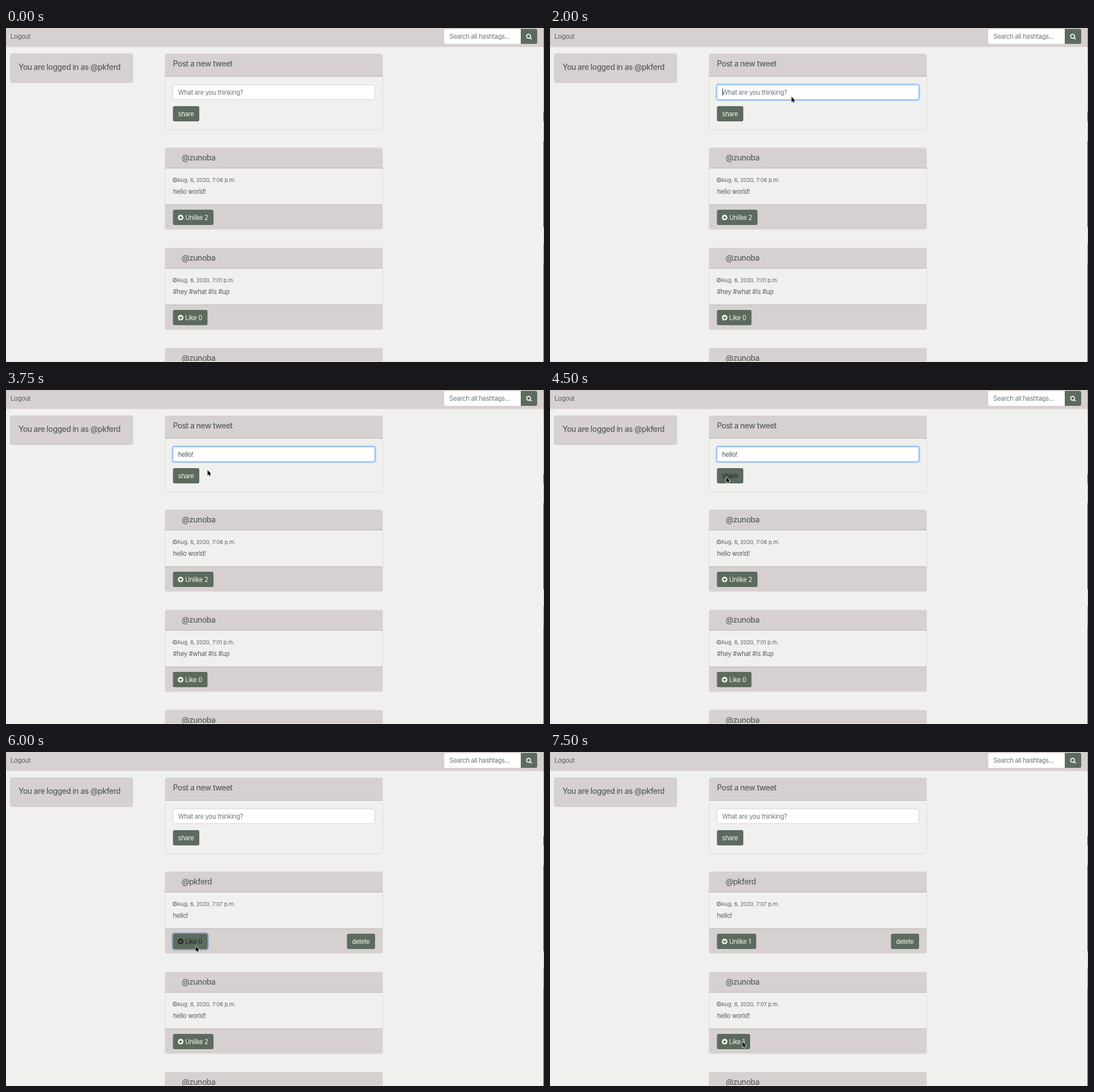
These frames come from a looping animation (949 by 590 pixels, 8000 ms). An HTML page with a canvas:

```html
<!DOCTYPE html>
<html lang="en">
<head>
<meta charset="utf-8">
<title>Post feed</title>
<style>
  html, body { margin: 0; width: 100%; height: 100%; overflow: hidden; background: #f0f0ee; }
  canvas { display: block; }
</style>
</head>
<body>
<canvas id="stage" width="949" height="590"></canvas>
<script>
const ctx = document.getElementById('stage').getContext('2d');
const LOOP = 8000, STEP = 250;
const ME = '@pkferd', FRIEND = '@zunoba';
const C = {
  page: '#f0f0ee', bar: '#d7d0d0', line: '#b9b5b4', edge: '#dddcda',
  green: '#5c6b5e', text: '#586158', body: '#566157', hint: '#6c7479',
  field: '#cfd3d7', focus: '#80b4f5', ink: '#495057', hover: '#202724'
};

// size, weight, tracking in em
const TYPE = {
  base: [11.2, 400, -0.025],
  head: [13.8, 500, -0.035],
  small: [9.3, 400, 0],
  option: [9, 600, 0]
};

function setType(kind) {
  const [size, weight, track] = TYPE[kind];
  ctx.font = `${weight} ${size}px Inter, "Liberation Sans", sans-serif`;
  ctx.letterSpacing = `${track * size}px`;
}

function text(str, x, y, color, kind = 'base') {
  setType(kind);
  ctx.fillStyle = color;
  ctx.fillText(str, x, y);
}

function widthOf(str, kind = 'base') {
  setType(kind);
  return ctx.measureText(str).width;
}

function box(x, y, w, h, r, fill, stroke, lineWidth = 1) {
  ctx.beginPath();
  ctx.roundRect(x, y, w, h, r);
  if (fill) { ctx.fillStyle = fill; ctx.fill(); }
  if (stroke) { ctx.strokeStyle = stroke; ctx.lineWidth = lineWidth; ctx.stroke(); }
}

function rect(x, y, w, h, fill) {
  ctx.fillStyle = fill;
  ctx.fillRect(x, y, w, h);
}

function heartIcon(x, y, color) {
  ctx.beginPath();
  ctx.arc(x, y, 4.9, 0, Math.PI * 2);
  ctx.fillStyle = color;
  ctx.fill();
  ctx.beginPath();
  ctx.moveTo(x, y + 3);
  ctx.lineTo(x - 2.8, y - 0.2);
  ctx.quadraticCurveTo(x - 2.4, y - 2.6, x, y - 1.2);
  ctx.quadraticCurveTo(x + 2.4, y - 2.6, x + 2.8, y - 0.2);
  ctx.fillStyle = C.green;
  ctx.fill();
}

function clockIcon(x, y) {
  ctx.strokeStyle = C.body;
  ctx.lineWidth = 1.1;
  ctx.beginPath();
  ctx.arc(x, y, 3.3, 0, Math.PI * 2);
  ctx.moveTo(x + 0.2, y - 2);
  ctx.lineTo(x + 0.2, y + 0.5);
  ctx.lineTo(x - 1.6, y + 0.5);
  ctx.stroke();
}

function button(label, x, y, { icon = false, hover = false, focus = false, right = false } = {}) {
  const lead = icon ? 21.5 : 9;
  const w = lead + widthOf(label) + 9.5;
  if (right) x -= w;
  if (focus) box(x - 1, y - 1, w + 2, 29, 4, null, 'rgba(100,135,205,.65)', 2.4);
  box(x, y, w, 27, 3, C.green);
  const color = hover ? C.hover : '#f4f6f3';
  if (icon) heartIcon(x + 13.5, y + 13.7, color);
  text(label, x + lead, y + 17.7, color);
}

function post(y, p) {
  box(280.5, y + 0.5, 384, 144.5, 3, C.page, C.edge);
  box(281, y + 1, 383, 35.5, [3, 3, 0, 0], C.bar);
  rect(281, y + 36, 383, 1, C.line);
  text(p.user, 310, y + 23, C.text, 'head');
  if (!p.time) return;
  clockIcon(298, y + 57.3);
  text(`Aug. 6, 2020, ${p.time} p.m.`, 302, y + 60.7, C.body, 'small');
  text(p.msg, 294.5, y + 82.3, C.body);
  box(281, y + 101, 383, 43.5, [0, 0, 3, 3], C.bar);
  rect(281, y + 100.5, 383, 1, C.line);
  button(p.like, 294.5, y + 110, { icon: true, hover: p.hover, focus: p.focus });
  if (p.own) button('delete', 651, y + 110, { right: true });
}

function navbar() {
  rect(0, 0, 949, 33.5, C.bar);
  text('Logout', 8, 19, C.text);
  box(773, 2, 136, 26, [3, 0, 0, 3], '#fff');
  text('Search all hashtags...', 782, 19, C.hint);
  box(908, 1.5, 29, 26.5, [0, 3, 3, 0], C.green);
  ctx.strokeStyle = '#fff';
  ctx.lineWidth = 1.7;
  ctx.beginPath();
  ctx.arc(921.8, 14.6, 3.5, 0, Math.PI * 2);
  ctx.moveTo(924.4, 17.2);
  ctx.lineTo(927.2, 20);
  ctx.stroke();
}

function compose(s) {
  box(280.5, 45.5, 384, 134, 3, C.page, C.edge);
  box(281, 46, 383, 40, [3, 3, 0, 0], C.bar);
  rect(281, 85, 383, 1, C.line);
  text('Post a new tweet', 294.5, 67.6, C.text, 'head');

  if (s.focused) box(293.5, 99.2, 358.5, 28.6, 4, null, 'rgba(120,175,255,.5)', 2.6);
  box(294.5, 100.5, 356, 26, 3, '#fff', s.focused ? C.focus : s.clicked ? '#bccfe2' : C.field);
  if (s.typed) text(s.typed, 303.5, 117.7, C.ink);
  else text('What are you thinking?', 303.5, 117.7, C.hint);
  if (s.caret) rect(304 + (s.typed ? widthOf(s.typed) : 0), 107, 1, 13, '#303538');
  button('share', 294.5, 138, { hover: s.shareHover, focus: s.sharePress });
}

function suggestions(list) {
  if (!list.length) return;
  const h = 11.5 + list.length * 25.5;
  ctx.save();
  ctx.shadowColor = 'rgba(0,0,0,.4)';
  ctx.shadowBlur = 3;
  ctx.shadowOffsetY = 1;
  box(294, 127, 135.5, h, [0, 0, 3, 3], '#fff');
  ctx.restore();
  list.forEach((item, i) => text(item, 302.8, 149.3 + i * 25.5, '#1c1c1c', 'option'));
}

// slivers of the desktop at the right rim
const RIM = [[0, '#8d8a8c'], [35, '#b99aa8'], [70, '#8fc0dc'], [148, '#35404c'], [165, '#7fb4cf'],
  [200, '#2c3c55'], [262, '#3a3b42'], [352, '#c9c6c4'], [382, '#8a7b76'], [416, '#54423d']];

function rim() {
  RIM.forEach(([y, color], i) => {
    const end = i + 1 < RIM.length ? RIM[i + 1][0] : 590;
    rect(948, y, 1, end - y, color);
  });
  rect(0, 589, 948, 1, '#e8e8e6');
}

// time, x, y of the pointer tip
const PATH = [
  [750, 760, 420], [1000, 600, 270], [1250, 455, 140], [1500, 426, 121.5], [3250, 426, 121.5],
  [3500, 400, 129], [4000, 311, 154], [5000, 311, 154], [5250, 318, 235], [5500, 332, 338],
  [5750, 334.5, 343], [6250, 334.5, 343], [6500, 394, 410], [6750, 380, 486],
  [7000, 345, 508], [7250, 339.5, 512]
];

function pointer(t) {
  if (t < PATH[0][0]) return;
  let i = PATH.findIndex(k => k[0] > t);
  if (i < 0) i = PATH.length;
  const a = PATH[i - 1], b = PATH[i] || a;
  const f = b === a ? 0 : (t - a[0]) / (b[0] - a[0]);
  ctx.save();
  ctx.translate(a[1] + (b[1] - a[1]) * f, a[2] + (b[2] - a[2]) * f);
  ctx.beginPath();
  [[0, 0], [0, 9.4], [2.2, 7.4], [3.7, 10.8], [5.2, 10.1], [3.8, 6.9], [6.7, 6.7]]
    .forEach(([x, y]) => ctx.lineTo(x, y));
  ctx.closePath();
  ctx.lineJoin = 'round';
  ctx.strokeStyle = '#fff';
  ctx.lineWidth = 1.4;
  ctx.stroke();
  ctx.fillStyle = '#000';
  ctx.fill();
  ctx.restore();
}

const TYPING = [[2250, 'h'], [2500, 'he'], [2750, 'hell'], [3000, 'hello'], [3250, 'hello!'], [5000, '']];
const HISTORY = ['hello world!', 'hello', 'hello there!', 'hi everyone', 'how are you?'];

function stateAt(t) {
  const within = (a, b) => t >= a && t < b;
  const typed = (TYPING.filter(k => k[0] <= t).pop() || [0, ''])[1];
  const hello = { user: FRIEND, time: '7:06', msg: 'hello world!', like: 'Unlike 2' };
  let posts;
  if (t < 5000) {
    posts = [hello, { user: FRIEND, time: '7:01', msg: '#hey #what #is #up', like: 'Like 0' }];
  } else {
    const mine = {
      user: ME, time: '7:07', msg: 'hello!', own: true,
      like: t < 6250 ? 'Like 0' : 'Unlike 1',
      hover: within(5750, 6250), focus: within(6000, 6250)
    };
    if (t >= 7500) Object.assign(hello, { time: '7:07', like: 'Like 1' });
    hello.hover = within(7000, 7500);
    hello.focus = within(7250, 7500);
    posts = [mine, hello];
  }
  posts.push({ user: FRIEND });
  return {
    typed, posts,
    clicked: within(1750, 2000),
    focused: within(2000, 4750),
    caret: within(1750, 3750) || within(4000, 4500),
    shareHover: within(4250, 5000),
    sharePress: within(4750, 5000),
    list: typed && t < 5000 ? HISTORY.filter(item => item.startsWith(typed)) : []
  };
}

function draw(t) {
  const s = stateAt(t);
  rect(0, 0, 949, 590, C.page);
  navbar();
  box(7.5, 45.5, 216, 51, 3, C.bar, '#d0cac9');
  text('You are logged in as ' + ME, 22, 73.5, C.text, 'head');
  compose(s);
  s.posts.forEach((p, i) => post(211 + i * 177, p));
  suggestions(s.list);
  rim();
  pointer(t);
}

const start = performance.now();
function tick() {
  const t = (performance.now() - start) % LOOP;
  draw(Math.floor(t / STEP) * STEP);
  requestAnimationFrame(tick);
}
tick();
</script>
</body>
</html>
```
